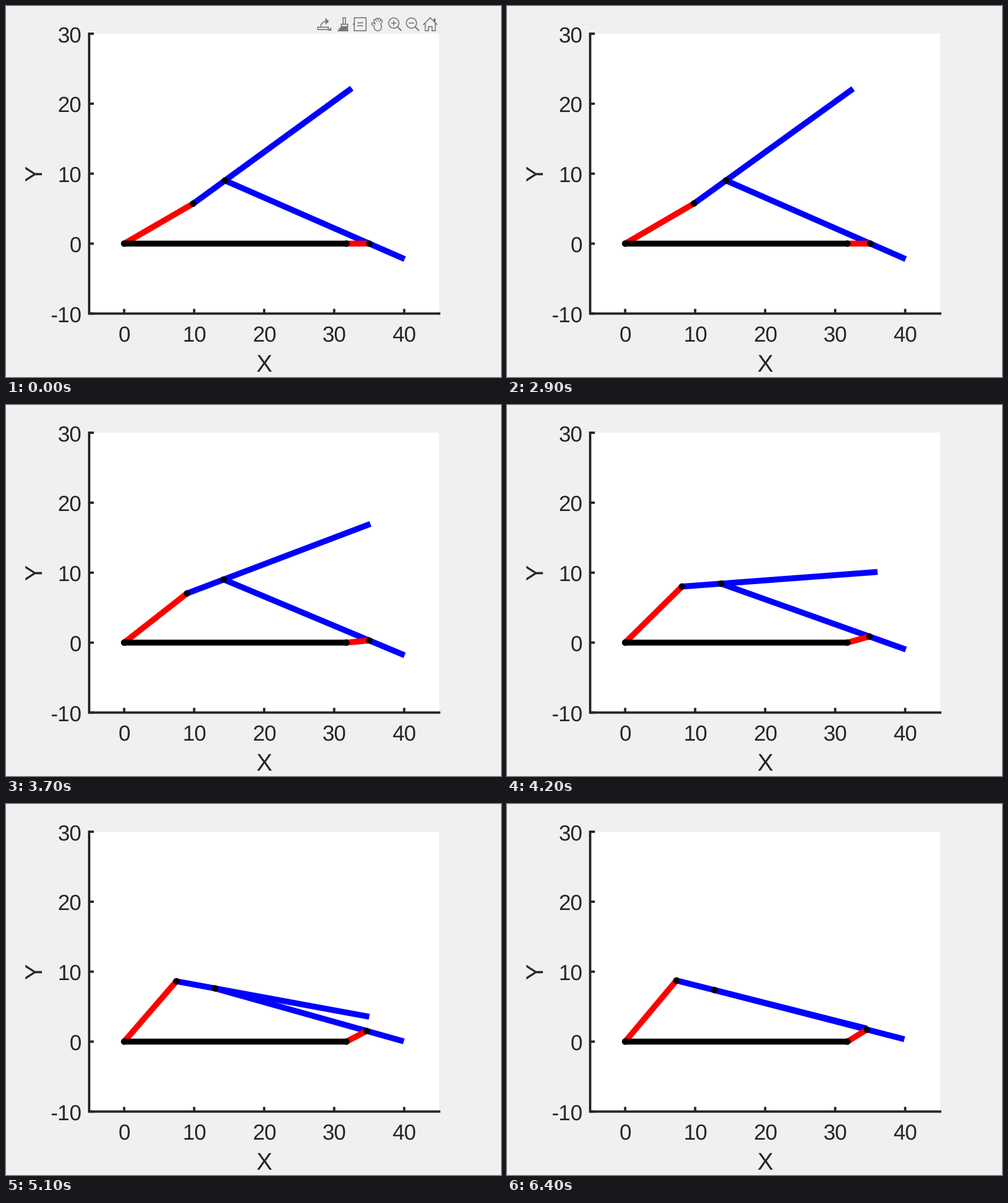
Animation, 840 px wide and 630 px high, one loop 6500 ms. Source, as a matplotlib script:

```python
import numpy as np
import matplotlib.pyplot as plt
from matplotlib.animation import FuncAnimation
from matplotlib.patches import Circle, Polygon, Rectangle

W, H, DPI = 840, 630, 100
PT = 72 / DPI
FRAMES, STEP = 65, 100
BACK, INK, ICON = "#f0f0f0", "#262626", "#787878"
ORIGIN, UNIT = np.array([200.5, 403.5]), 11.88
LEFT, RIGHT, BOTTOM, TOP = -5, 45, -10, 30

# Linkage dimensions in data units
GROUND, CRANK, ROCKER = 31.74, 11.4, 3.28
ARM, PIVOT = 28.02, 5.61

plt.rcParams.update({"font.family": "Liberation Sans", "text.hinting": "none"})
fig = plt.figure(figsize=(W / DPI, H / DPI), dpi=DPI, facecolor=BACK)
ax = fig.add_axes([0, 0, 1, 1])
ax.set_xlim(0, W)
ax.set_ylim(H, 0)
ax.axis("off")


def to_px(p):
    return ORIGIN + np.asarray(p) * [UNIT, -UNIT]


def stroke(pts, color, width, z=1, cap="butt"):
    xs, ys = np.transpose(pts)
    return ax.plot(xs, ys, color=color, lw=width * PT, zorder=z, snap=False,
                   solid_capstyle=cap, solid_joinstyle="miter")[0]


def label(x, y, text, size, **style):
    ax.text(x, y, text, fontsize=size * PT, color=INK, va="baseline",
            rotation_mode="anchor", **{"ha": "center", **style})


def draw_axes():
    x0, y0 = to_px((LEFT, BOTTOM))
    x1, y1 = to_px((RIGHT, TOP))
    ax.add_patch(Rectangle((x0, y1), x1 - x0, y0 - y1, fc="white", lw=0))
    stroke([(x0, y1 - 2), (x0, y0), (x1 + 2, y0)], INK, 4)
    for v in range(BOTTOM, TOP + 1, 10):
        y = to_px((0, v))[1]
        stroke([(x0, y), (x0 + 8, y)], INK, 4)
        label(128, y + 15.2, str(v), 36.7, ha="right")
    for v in range(0, RIGHT, 10):
        x = to_px((v, 0))[0]
        stroke([(x, y0), (x, y0 - 8)], INK, 4)
        label(x, 571, str(v), 36.7)
    label((x0 + x1) / 2, 621, "X", 40.5)
    label(61, (y0 + y1) / 2, "Y", 40.5, rotation=90)


def draw_toolbar(y=31, pitch=30):
    share, brush, tip, hand, plus, minus, home = 540 + pitch * np.arange(7)
    parts = []

    def line(*pts, color=ICON, width=1.7, cap="butt"):
        parts.append(stroke(pts, color, width, cap=cap))

    def solid(*pts):
        parts.append(ax.add_patch(Polygon(pts, fc=ICON, lw=0)))

    def box(x, top, w, h):
        parts.append(ax.add_patch(Rectangle((x - w / 2, top), w, h, fc=BACK,
                                            ec=ICON, lw=1.7 * PT)))

    # curved arrow over a tray
    u = np.linspace(0, np.pi / 2, 12)
    line(*zip(share + 3 - 9 * np.cos(u), y + 5 - 10 * np.sin(u)))
    solid((share + 2, y - 11), (share + 8, y - 5), (share + 2, y + 1))
    box(share - 2, y + 5, 18, 4)
    solid((share + 12, y + 5), (share + 12, y + 11), (share + 6, y + 11))

    # brush
    box(brush + 4, y - 11, 4, 11)
    box(brush + 4, y, 11, 4)
    solid((brush - 2, y + 4), (brush + 10, y + 4), (brush + 11, y + 12),
          (brush - 8, y + 12))

    # note with two lines
    box(tip + 1, y - 11, 20, 22)
    for dy in (-2.5, 2.5):
        line((tip - 4, y + dy), (tip + 6, y + dy))
    solid((tip - 12, y), (tip - 8, y - 3), (tip - 8, y + 3))

    # hand: wide gray fingers, then narrower background ones on top
    for color, trim in ((ICON, 0), (BACK, 3.2)):
        for deg in (-52, -22, -6, 9, 26):
            a = np.radians(deg)
            reach = 15 - abs(deg) / 13
            line((hand + 1, y + 5),
                 (hand + 1 + reach * np.sin(a), y + 6 - reach * np.cos(a)),
                 color=color, width=5.4 - trim, cap="round")
        line((hand + 1, y + 4), (hand + 1, y + 5), color=color,
             width=14 - trim, cap="round")

    # magnifiers
    for x in (plus - 2, minus - 2):
        parts.append(ax.add_patch(Circle((x, y - 2), 8.7, fill=False, ec=ICON,
                                         lw=1.7 * PT)))
        line((x + 6, y + 4), (x + 13, y + 11), width=2.2)
        line((x - 4.5, y - 2), (x + 4.5, y - 2))
    line((plus - 2, y - 6.5), (plus - 2, y + 2.5))

    # house
    line((home + 7.5, y - 4), (home + 7.5, y - 10), width=3)
    line((home - 12, y + 1), (home, y - 11), (home + 12, y + 1))
    for s in (-1, 1):
        line((home + 8.5 * s, y - 2), (home + 8.5 * s, y + 11),
             (home + 3 * s, y + 11), (home + 3 * s, y + 4), (home, y + 4))
    return parts


def ease(t, mid, rate):
    """Gompertz curve: abrupt start, long settling tail."""
    return np.exp(-np.exp(-rate * (t - mid)))


def polar(length, degrees):
    a = np.radians(degrees)
    return length * np.array([np.cos(a), np.sin(a)])


def pose(t):
    crank = 30.1 + 20 * ease(t, 3.66, 2.12)
    finger = 36.06 - 50.6 * ease(t, 3.795, 1.89)
    rocker = 32.3 * ease(t, 4.03, 1.76)
    a, e = np.zeros(2), np.array([GROUND, 0])
    b = a + polar(CRANK, crank)
    c = b + polar(PIVOT, finger)
    d = e + polar(ROCKER, rocker)
    upper = b + polar(ARM, finger)
    lower = c + (d - c) / np.hypot(*(d - c)) * ARM
    return a, b, c, d, e, upper, lower


draw_axes()
toolbar = draw_toolbar()
links = [stroke([(0, 0), (0, 0)], color, 10, z=3 + i)
         for i, color in enumerate(("red", "blue", "blue", "red", "black"))]
joints = [ax.add_patch(Circle((0, 0), 5.5, color="black", lw=0, zorder=9))
          for _ in range(5)]


def update(i):
    t = i * STEP / 1000
    a, b, c, d, e, upper, lower = pose(t)
    ends = [(a, b), (b, upper), (c, lower), (e, d), (a, e)]
    for link, pair in zip(links, ends):
        link.set_data(*to_px(pair).T)
    for joint, p in zip(joints, (a, b, c, d, e)):
        joint.center = to_px(p)
    for part in toolbar:
        part.set_visible(t < 1.4)
    return [*links, *joints, *toolbar]


anim = FuncAnimation(fig, update, frames=FRAMES, interval=STEP, repeat=True,
                     repeat_delay=0, blit=False)
plt.show()
```
